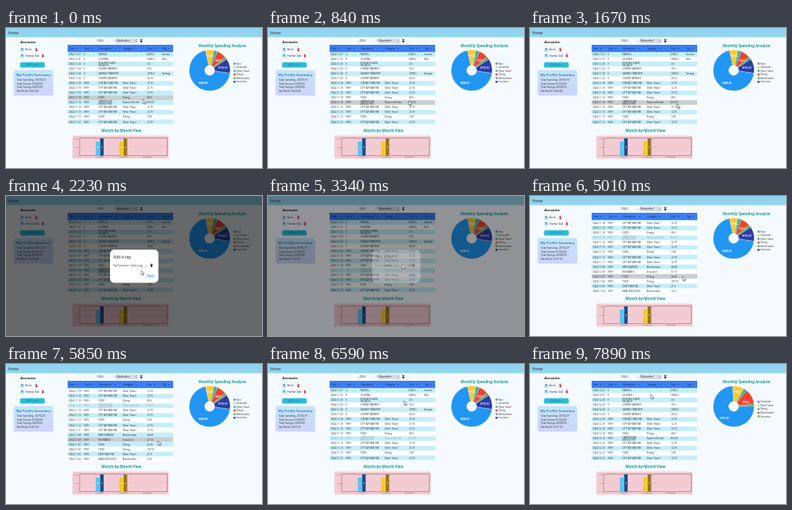
Animation, 320 px wide and 175 px high, one loop 7990 ms. Source, as an HTML page:

```html
<!DOCTYPE html>
<html lang="en">
<head>
<meta charset="utf-8">
<title>Spending dashboard</title>
<style>
html, body { margin: 0; width: 100%; height: 100%; overflow: hidden; background: #f5fafe; }
svg { display: block; width: 100vw; height: 100vh; font-family: "Open Sans", "Noto Sans", sans-serif; }
text { white-space: pre; }
</style>
</head>
<body>
<svg id="stage" viewBox="0 0 320 175">
  <defs>
    <clipPath id="body"><rect x="77" y="30" width="132" height="91"/></clipPath>
    <linearGradient id="panel" x2="0" y2="1">
      <stop stop-color="#c6e4f8"/><stop offset="1" stop-color="#ccd3fa"/>
    </linearGradient>
  </defs>
</svg>
<script>
const LOOP = 7990, ROW = 6.03, TOP = 30;
const stage = document.getElementById('stage');

function add(parent, tag, attrs, content) {
  const el = document.createElementNS('http://www.w3.org/2000/svg', tag);
  for (const key in attrs) el.setAttribute(key, attrs[key]);
  if (content !== undefined) el.textContent = content;
  parent.appendChild(el);
  return el;
}
const group = (parent, attrs = {}) => add(parent, 'g', attrs);
const box = (parent, x, y, width, height, fill, rx = 0) =>
  add(parent, 'rect', { x, y, width, height, fill, rx });
const label = (parent, x, y, size, content, fill = '#222', more = {}) =>
  add(parent, 'text', { x, y, 'font-size': size, fill, ...more }, content);
const bold = { 'font-weight': 700 };
const centered = { ...bold, 'text-anchor': 'middle' };

function trash(parent, x, y, fill) {
  add(parent, 'path', {
    d: `M${x} ${y + .6}h3.2v.7h-3.2zM${x + 1} ${y}h1.2v.6h-1.2zM${x + .4} ${y + 1.6}h2.4l-.2 2.7h-2z`, fill
  });
}
const caret = (x, y) =>
  add(stage, 'path', { d: `M${x} ${y}l.9 1 .9-1`, fill: 'none', stroke: '#444', 'stroke-width': .4 });

// Page header, accounts and summary
box(stage, 0, 0, 320, 175, '#f5fafe');
box(stage, 0, 0, 320, 11.5, '#92d4ee');
label(stage, 3, 7.7, 4.5, 'Home');
label(stage, 18, 19.2, 4.2, 'Accounts', '#111', bold);
[['Birch', 27, 36.3], ['Harbor Oak', 34.5, 44.5]].forEach(([name, y, x]) => {
  add(stage, 'path', {
    d: `M18.4 ${y - .6}l1.8-1.3 1.8 1.3zM18.9 ${y - .4}v1.8M20.2 ${y - .4}v1.8M21.5 ${y - .4}v1.8M18.3 ${y + 1.6}h3.8`,
    fill: '#3b93d6', stroke: '#3b93d6', 'stroke-width': .5
  });
  label(stage, 24.3, y + 1.1, 3.2, name);
  trash(stage, x, y - 2.2, '#d92c38');
});
box(stage, 17.5, 42.8, 31, 6.6, '#2bbdd8', 2);
label(stage, 33, 47.1, 2.6, 'Add Account', '#187a9c', { 'text-anchor': 'middle' });
box(stage, 9.5, 52.5, 49.5, 32, 'url(#panel)', 2.5);
label(stage, 34.2, 59.6, 4.25, 'My Profile Summary', '#2687c0', centered);
const summary = [0, 1, 2, 3].map(i => label(stage, 13.5, 66.4 + i * 4.5, 3, '', '#333'));

// Month picker
label(stage, 114, 17.3, 3.3, '2024', '#222');
caret(134.2, 15.6);
box(stage, 137, 12.7, 28, 6.8, '#d9dde1', .5);
const month = label(stage, 138.3, 17.3, 3.3, '', '#222');
caret(161.6, 15.6);
trash(stage, 167.5, 13.8, '#333');

// Transactions: day, card, description, category, cost, tag
const fare = (day, cost = '-12.75') => [day, '9999', 'CITY TAP FARE PAY', 'Other Travel', cost];
const food = (day, cost) => [day, '9999', 'FOOD', 'Dining', cost];
const payment = 10;
const entries = [
  ['27', '0', 'PAYROLL', '', '2500.0', 'Income'],
  ['21', '0', 'HOUSING', '', '-2000.0', 'Rent'],
  ['20', '0', 'NON-BIRCH ATM|FEE-WITH', '', '-3.0'],
  ['20', '0', 'CURRNT PAYMENT', '', '-75.0'],
  ['20', '0', 'SAVINGS TRANSFER', '', '-1000.0', 'Savings'],
  ['20', '0', 'CURRNT PAYMENT', '', '-30.29'],
  ['20', '9999', 'CONTACT FARE PAY', 'Other Travel', '-13.75'],
  fare('18'), fare('18'), food('18', '-90.6'),
  ['14', '9999', 'HARBOR OAK|MOBILE PMT', 'Payment/Credit', '455.00'],
  fare('14'), fare('13'), food('13', '-7.00'), fare('12'), fare('11'),
  ['08', '9999', 'MERCHANDISE', 'Merchandise', '-34.68'],
  ['08', '9999', 'INSURANCE', 'Insurance', '-57.13'],
  food('07', '-36.45'), food('06', '-107.67'),
  ['05', '9999', 'JOINT FARE PAY', 'Other Travel', '-21.9'],
  ['04', '9999', 'MARLOW GOODS', 'Merchandise', '-12.4'],
  fare('03'), food('02', '-18.2')
];
const columns = [78.5, 97, 115.5, 145.8, 175.5, 195];
box(stage, 77, 21, 132, 100, '#fff');
const table = group(group(stage, { 'clip-path': 'url(#body)' }));
const rows = entries.map((cells, i) => {
  const y = TOP + i * ROW;
  const back = box(table, 77, y, 132, ROW, '#fff');
  const text = group(table);
  let date, tag;
  cells.forEach((cell, c) => {
    const lines = cell.split('|');
    lines.forEach((line, n) => {
      const shift = lines.length > 1 ? n * 2.7 - 1.35 : 0;
      const el = label(text, columns[c], y + 4.1 + shift, c === 2 ? 2.75 : 2.9, line, '#252b31');
      if (c === 0) date = el;
      if (c === 5) tag = el;
    });
  });
  return { back, text, date, tag, day: cells[0] };
});
box(stage, 77, 21, 132, 9, '#3a7ff4');
['Date', 'Card', 'Description', 'Category', 'Cost', 'Tag'].forEach((name, c) => {
  label(stage, columns[c] + 1, 26.5, 2.8, name, '#12294d');
  const x = columns[c] + 3 + name.length * 1.6;
  add(stage, 'path', { d: `M${x} 25h1.6l-.8 1.2z`, fill: '#12294d' });
});

// Pie charts: name, colour, end angle clockwise from the top
label(stage, 270.5, 24, 4.45, 'Monthly Spending Analysis', '#179c9c', centered);
const [BLUE, YELLOW, TEAL, RED, GREEN, NAVY] =
  ['#2196f3', '#ffc928', '#20b8b0', '#f0442f', '#4caf50', '#2b3aa8'];
const OUTER = 25.6, INNER = 6.3;

function point(deg, r) {
  const a = deg * Math.PI / 180;
  return `${254.6 + r * Math.sin(a)} ${53 - r * Math.cos(a)}`;
}
function pie(slices, notes, legendTop) {
  const g = group(stage);
  let from = slices[0][2] - 360;
  slices.slice(1).concat([slices[0]]).forEach(([, fill, to]) => {
    const large = to - from > 180 ? 1 : 0;
    add(g, 'path', {
      d: `M${point(from, OUTER)}A${OUTER} ${OUTER} 0 ${large} 1 ${point(to, OUTER)}` +
         `L${point(to, INNER)}A${INNER} ${INNER} 0 ${large} 0 ${point(from, INNER)}Z`,
      fill, stroke: '#f5fafe', 'stroke-width': .3
    });
    from = to;
  });
  notes.forEach(([x, y, value]) => label(g, x, y, 2.7, value, '#fff', centered));
  slices.forEach(([name, fill], i) => {
    const y = legendTop + i * 4.55;
    box(g, 284.5, y - 1.2, 2.4, 2.4, fill);
    label(g, 288, y + 1, 2.8, name, '#333');
  });
  return g;
}
const pies = [
  pie([['Rent', BLUE, 348], ['Unnamed', YELLOW, 12], ['Other Travel', TEAL, 22],
       ['Dining', RED, 49], ['Merchandise', GREEN, 57], ['Insurance', NAVY, 98]],
      [[246, 70, '$2000.00'], [255, 36, '$108.2'], [266, 42, '$241.7'], [271, 51, '$1112.91']], 44.5),
  pie([['Unnamed', BLUE, 357], ['Other Travel', YELLOW, 30], ['Dining', TEAL, 39],
       ['Merchandise', RED, 83], ['Insurance', GREEN, 90]],
      [[243, 69, '$3151.85'], [259, 36, '$153.0'], [270, 49, '$916.2']], 47.3)
];

// Month-by-month bars
label(stage, 144.3, 130, 4.5, 'Month-by-Month View', '#179c9c', centered);
box(stage, 83, 134.4, 120.5, 28.8, '#f3cbd3', 1);
add(stage, 'path', { d: 'M92 137.6H201.5V159.6H92Z', fill: 'none', stroke: '#7d545d', 'stroke-width': .5 });
add(stage, 'path', { d: 'M92 148.6H201.5', stroke: '#d3a9b2', 'stroke-width': .35 });
['2.0K', '1.0K', '0'].forEach((value, i) =>
  label(stage, 90.8, 139 + i * 10.6, 2.5, value, '#444', { 'text-anchor': 'end' }));
[[112.4, 142, '#52c4f2'], [117.6, 138, '#12508f'], [141.7, 142, '#f6c91c'], [147, 138, '#967821']]
  .forEach(([x, y, fill]) => {
    box(stage, x, y, 4.5, 159.6 - y, fill);
    label(stage, x + 2.25, 149, 1.7, '$$', '#fff', centered);
  });
['October', 'November', 'December'].forEach((name, i) =>
  label(stage, 117.5 + i * 29.5, 162.3, 2.3, name, '#444', { 'text-anchor': 'middle' }));

// Dialog
const shade = box(stage, 0, 0, 320, 175, '#000');
const dialog = group(stage);
box(dialog, 130, 67, 60.5, 41.5, '#fff', 5);
label(dialog, 134, 77.7, 5, 'Add a tag');
label(dialog, 134, 88, 2.75, 'Tag Transaction:', '#333');
const choice = label(dialog, 156, 88, 2.75, '', '#333');
add(dialog, 'path', { d: 'M156 89h20', stroke: '#888', 'stroke-width': .3 });
add(dialog, 'path', { d: 'M174.2 86.4h2l-1 1.2z', fill: '#555' });
trash(dialog, 180.3, 84.5, '#333');
box(dialog, 174, 97.5, 13, 5.5, '#d9ecfd', 2.7);
label(dialog, 180.5, 101.2, 2.8, 'Done', '#1d6fc0', { 'text-anchor': 'middle' });

const pointer = add(stage, 'path', {
  d: 'M0 0V5.6L1.4 4.4 2.3 6.4 3.2 6 2.3 4.1H4.1Z', fill: '#fff', stroke: '#222', 'stroke-width': .45
});

// Keyed motion: [time, ...values]
const pointerKeys = [
  [0, 171, 89], [840, 176, 91], [1670, 184, 95], [1950, 184, 95], [2230, 169, 93],
  [2600, 167, 86], [3340, 168, 85.5], [3700, 178, 93], [4270, 188, 97], [4550, 191, 101],
  [5480, 191, 100], [5850, 190, 96], [6130, 188, 94], [6590, 170, 46], [6870, 153, 19],
  [7150, 152, 18], [7610, 151, 37], [7890, 151, 38], [7990, 151, 38]
];
const scrollKeys = [[0, 0], [4500, 0], [4960, 41], [6130, 41], [6500, 0], [7990, 0]];
const fadeKeys = [[0, 0], [1950, 0], [2180, 1], [3220, 1], [3340, .72], [3500, 0], [7990, 0]];

function at(keys, t) {
  const i = Math.max(1, keys.findIndex(key => key[0] >= t));
  const a = keys[i - 1], b = keys[i];
  const u = (t - a[0]) / (b[0] - a[0]);
  const k = u * u * (3 - 2 * u);
  return a.slice(1).map((v, n) => v + (b[n + 1] - v) * k);
}

function draw(now) {
  const t = now % LOOP;
  const [x, y] = at(pointerKeys, t);
  const [scroll] = at(scrollKeys, t);
  const [fade] = at(fadeKeys, t);
  const tagged = t >= 3300, december = t >= 7400;

  const values = tagged ? ['-$6732.07', '$767.93'] : ['-$6576.60', '$923.40'];
  ['Total Spending: ' + values[0], 'Total Income: $7500.00',
   'Total Savings: $2000.00', 'Net Worth: ' + values[1]]
    .forEach((line, i) => summary[i].textContent = line);
  month.textContent = december ? 'December' : 'November';
  pies[0].setAttribute('visibility', december ? 'hidden' : 'visible');
  pies[1].setAttribute('visibility', december ? 'visible' : 'hidden');

  // Rows light up only while the pointer rests on the list
  const resting = fade === 0 && t < 6130;
  const hover = resting ? Math.floor((y + 1 + scroll - TOP) / ROW) : -1;
  table.setAttribute('transform', `translate(0 ${-scroll})`);
  rows.forEach((row, i) => {
    row.back.setAttribute('fill', i === hover ? '#c9ced1' : i % 2 ? '#fff' : '#c6eefa');
    row.text.setAttribute('opacity', i === payment && tagged && !december ? .35 : 1);
    row.date.textContent = `2024-${december ? 12 : 11}-${row.day}`;
    if (row.tag) row.tag.setAttribute('visibility', december ? 'hidden' : 'visible');
  });

  shade.setAttribute('opacity', .58 * fade);
  dialog.setAttribute('opacity', Math.max(0, 2.6 * fade - 1.6));
  choice.textContent = t < 2700 ? 'Select a tag' : 'Hidden';
  pointer.setAttribute('transform', `translate(${x} ${y})`);
}

const start = performance.now();
function tick() {
  draw(performance.now() - start);
  requestAnimationFrame(tick);
}
tick();
</script>
</body>
</html>
```
